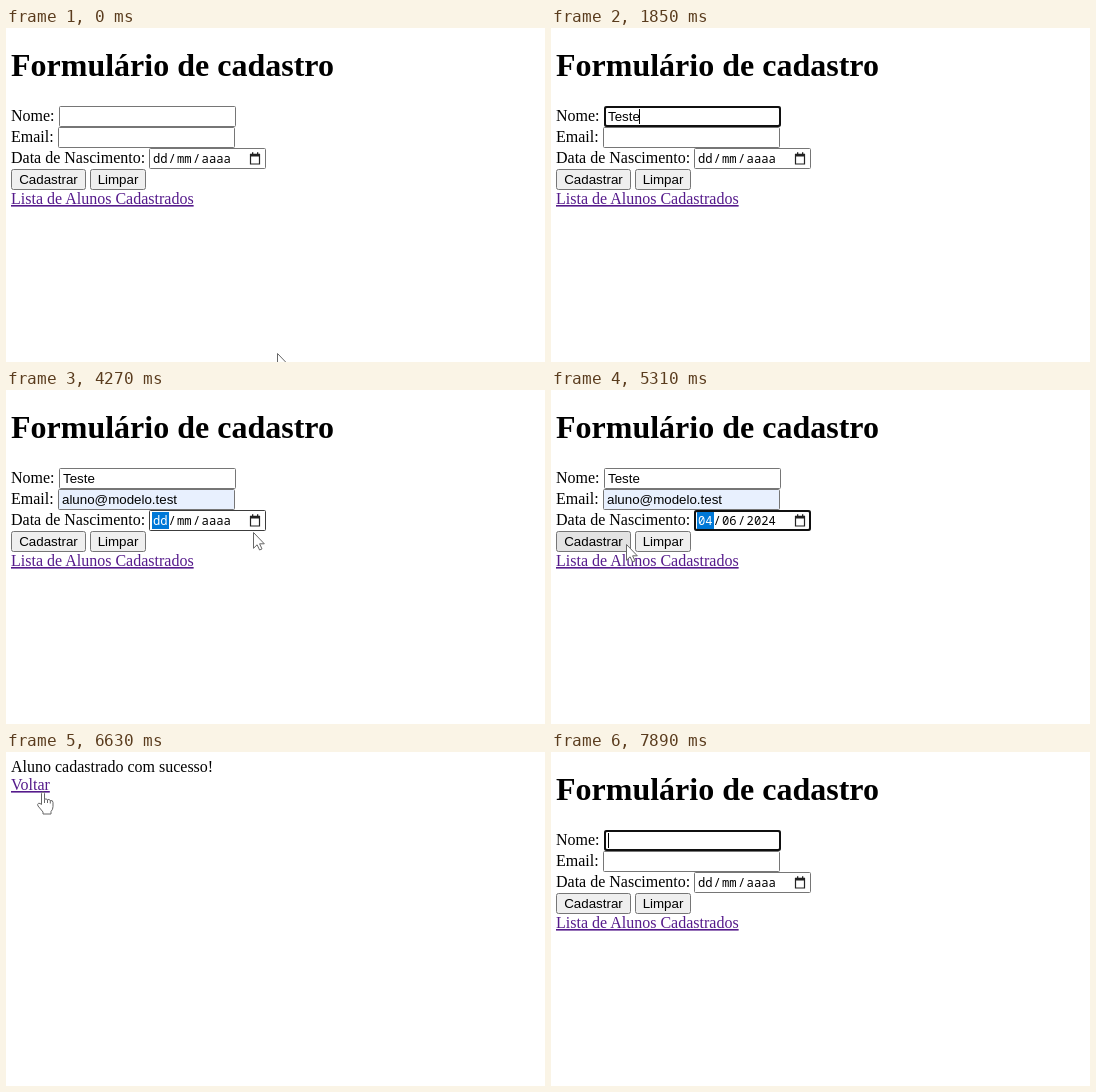
An HTML page that plays this animation: 539x334 px, repeating every 8000 ms.

```html
<!DOCTYPE html>
<html lang="pt-BR">
<head>
<meta charset="utf-8">
<title>Formulário de cadastro</title>
<style>
  html, body { margin: 0; width: 100%; height: 100%; overflow: hidden; background: #fff; }
  svg { display: block; width: 100vw; height: 100vh; }
  text { font: 16px "Liberation Serif", "Times New Roman", serif; white-space: pre; }
  .title { font-size: 32px; font-weight: bold; }
  .link { fill: #551a8b; text-decoration: underline 1px; text-underline-offset: 1px; }
  .ui { font: 13.333px "Liberation Sans", Arial, sans-serif; }
  .mid { text-anchor: middle; }
  .date { font: 12.2px "Noto Sans Mono", "DejaVu Sans Mono", monospace; }
  .box { fill: #fff; stroke: #767676; }
  .button { fill: #efefef; stroke: #767676; }
  .ring { fill: none; stroke: #101010; stroke-width: 2; }
  .cursor { fill: #fff; stroke: #666; stroke-width: 1; stroke-linejoin: round; }
</style>
</head>
<body>
<svg viewBox="0 0 539 334">
  <g id="form">
    <text class="title" x="5" y="48">Formulário de cadastro</text>
    <text x="5" y="93">Nome:</text>
    <text x="5" y="114">Email:</text>
    <text x="5" y="135">Data de Nascimento:</text>

    <rect class="box" x="53.5" y="78.5" width="176" height="20" rx="1"/>
    <rect class="box" id="emailBox" x="52.5" y="99.5" width="176" height="20" rx="1"/>
    <rect class="box" id="dateBox" x="143.5" y="120.5" width="116" height="20" rx="1"/>
    <text class="ui" id="name" x="57" y="93"></text>
    <text class="ui" id="email" x="56" y="114"></text>

    <rect id="dayMark" x="146" y="122" width="17" height="17" fill="#0078d7"/>
    <text class="date" id="day" x="147" y="135"></text>
    <text class="date" x="162.6" y="135">/</text>
    <text class="date" id="month" x="171" y="135"></text>
    <text class="date" x="187" y="135">/</text>
    <text class="date" id="year" x="195.6" y="135"></text>
    <path d="M244.5 126.5h9v9.5h-9z" fill="none" stroke="#222" stroke-width="1.2"/>
    <path d="M244 125.7h10v2.8h-10zM246 124.3h1.3v2H246zM251 124.3h1.3v2h-1.3z" fill="#222"/>

    <rect class="button" id="submit" x="5.5" y="141.5" width="74" height="20" rx="2"/>
    <rect class="button" x="84.5" y="141.5" width="55" height="20" rx="2"/>
    <text class="ui mid" x="42.5" y="156">Cadastrar</text>
    <text class="ui mid" x="112" y="156">Limpar</text>
    <text class="link" x="5" y="176">Lista de Alunos Cadastrados</text>

    <rect class="ring" id="ring" height="19" rx="2"/>
    <rect id="caret" width="1" height="15"/>
  </g>
  <g id="done">
    <text x="5" y="20">Aluno cadastrado com sucesso!</text>
    <text class="link" x="5" y="38">Voltar</text>
  </g>
  <path class="cursor" id="arrow" d="M.5 .5V16.3L4.1 12.8 6.6 18 9 16.9 6.6 11.8H11.3Z"/>
  <path class="cursor" id="hand" d="M5 13V2Q5 .5 6.5 .5T8 2V8Q9.5 6.5 11 8.3 12.5 7.2 13.8 9 16.5 8.5 16.5 11V15Q16.5 18 14.5 20V22.5H6.5V20.5L1.5 14.5Q.5 12.5 2 11.8 3.5 11.5 5 13ZM8 8V11.5M11 8.3V11.5M13.8 9V12"/>
</svg>
<script>
const LOOP = 8000;
const el = id => document.getElementById(id);
const show = (id, on) => el(id).style.display = on ? '' : 'none';
const move = (id, x, y) => el(id).setAttribute('transform', `translate(${x} ${y})`);

// Each row takes effect at its time and holds until the next one.
const tracks = {
  page: [[0, 'form'], [5600, 'done'], [6740, 'form']],
  name: [[0, ''], [1000, 'T'], [1160, 'Te'], [1300, 'Tes'], [1480, 'Test'], [1580, 'Teste'], [5600, '']],
  email: [[0, ''], [2140, 'a'], [2240, 'al'], [2540, 'aluno@modelo.test'], [5600, '']],
  focus: [[0, ''], [820, 'name'], [1950, 'email'], [3780, ''], [4480, 'date'], [5600, ''], [7280, 'name']],
  caret: [[0, true], [2540, false], [7280, true], [7720, false], [7890, true]],
  dayMark: [[0, false], [3780, true], [5600, false]],
  date: [[0, 'dd/mm/aaaa'], [4480, '04/06/2024'], [5600, 'dd/mm/aaaa']],
  dateHover: [[0, false], [3480, true], [4480, false]],
  submitHover: [[0, false], [5240, true], [5600, false]]
};
const at = (track, t) => tracks[track].findLast(([time]) => time <= t)[1];

// Visible stretches of the pointer: [time, x, y]
const paths = [
  [[0, 271, 325], [100, 271, 325], [450, 235, 210], [720, 195, 102]],
  [[3480, 232, 124], [3780, 248, 130], [3990, 248, 132], [4180, 247, 142], [4480, 247, 142]],
  [[4950, 213, 198], [5130, 130, 172], [5300, 75, 154], [5800, 75, 154], [6060, 60, 90], [6280, 37, 39.5], [6840, 37, 39.5], [7130, 55, 76]]
];

function pointer(t) {
  const path = paths.find(p => t >= p[0][0] && t < p.at(-1)[0]);
  if (!path) return null;
  const i = path.findIndex(([time]) => time > t);
  const [t0, x0, y0] = path[i - 1], [t1, x1, y1] = path[i];
  const k = (t - t0) / (t1 - t0);
  return [x0 + (x1 - x0) * k, y0 + (y1 - y0) * k];
}

const fields = { name: [53, 78, 177], email: [52, 99, 177], date: [143, 120, 117] };

function drawFocus(focus, caretOn) {
  show('ring', focus);
  const typing = focus === 'name' || focus === 'email';
  show('caret', typing && caretOn);
  if (!focus) return;
  const [x, y, width] = fields[focus];
  move('ring', x + 1, y + 1);
  el('ring').setAttribute('width', width - 2);
  if (typing) move('caret', Math.floor(x + 4 + el(focus).getComputedTextLength()), y + 3);
}

function render(t) {
  const page = at('page', t);
  show('form', page === 'form');
  show('done', page === 'done');

  for (const id of ['name', 'email']) el(id).textContent = at(id, t);
  el('emailBox').style.fill = at('email', t).includes('@') ? '#e8f0fe' : '';
  const parts = at('date', t).split('/');
  ['day', 'month', 'year'].forEach((id, i) => el(id).textContent = parts[i]);
  const marked = at('dayMark', t);
  show('dayMark', marked);
  el('day').style.fill = marked ? '#fff' : '';
  el('dateBox').style.stroke = at('dateHover', t) ? '#3c3c3c' : '';
  el('submit').style.fill = at('submitHover', t) ? '#e3e3e3' : '';
  if (page === 'form') drawFocus(at('focus', t), at('caret', t));

  const tip = pointer(t);
  const onLink = page === 'done' && t >= 6240;
  show('arrow', tip && !onLink);
  show('hand', tip && onLink);
  if (tip) {
    move('arrow', ...tip);
    move('hand', tip[0] - 6.5, tip[1]);
  }
}

const start = performance.now();
function tick() {
  render((performance.now() - start) % LOOP);
  requestAnimationFrame(tick);
}
tick();
</script>
</body>
</html>
```
